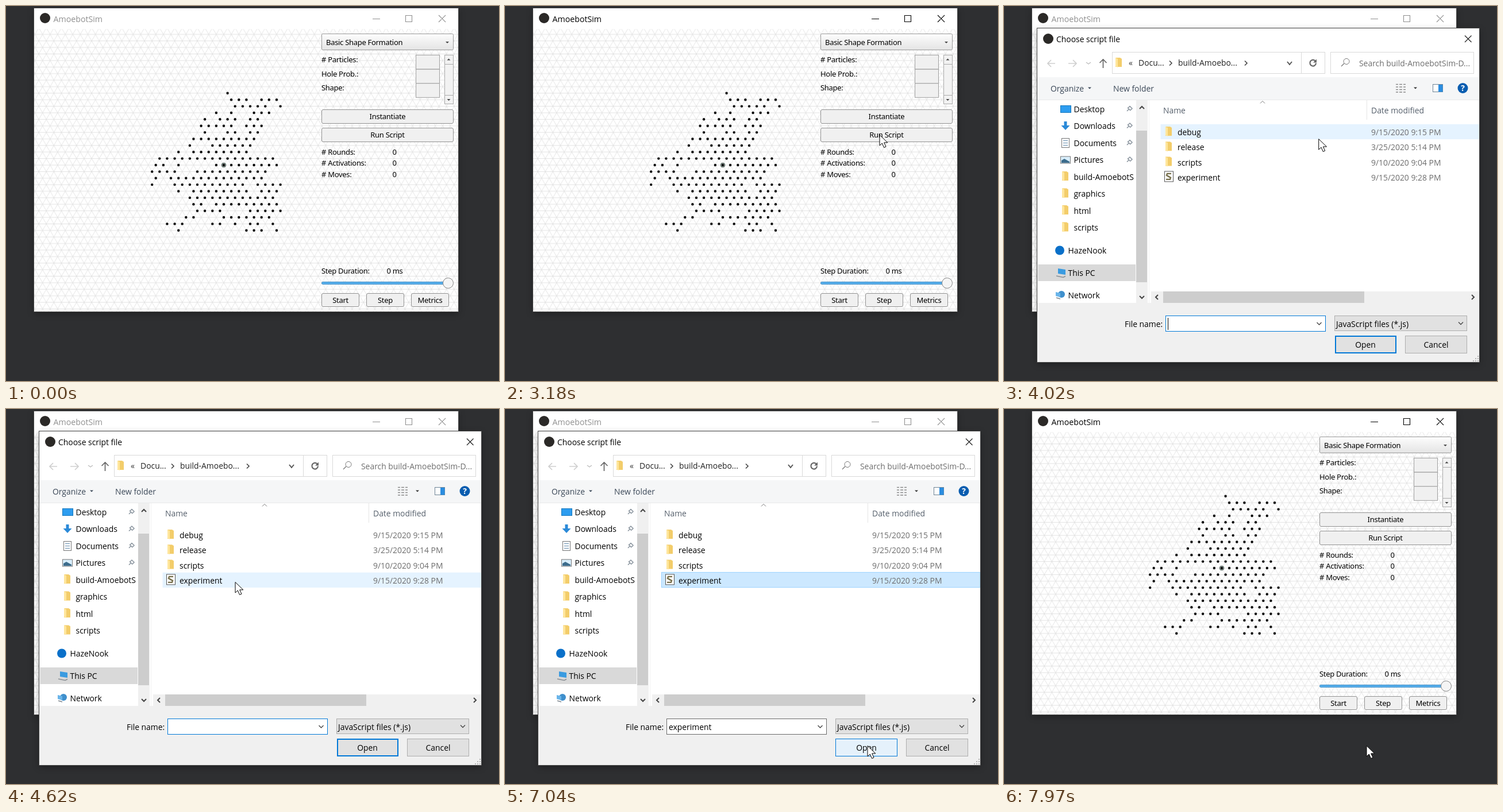
Animation, 858 px wide and 653 px high, one loop 8 s. Source, as an HTML page:

```html
<!DOCTYPE html>
<html lang="en">
<head>
<meta charset="utf-8">
<title>Choosing a script</title>
<style>
  html, body { margin: 0; width: 100%; height: 100%; overflow: hidden; background: #2e2f31; }
  svg { display: block; width: 858px; height: 653px; }
  text { font: 13.9px "Open Sans", sans-serif; white-space: pre; }
  #panel text { font: 13px "Noto Sans", sans-serif; letter-spacing: -.3px; }
  .shadow { filter: drop-shadow(0 3px 6px rgba(0, 0, 0, .35)); }
</style>
</head>
<body>
<script>
const LOOP = 8000;

// ---- drawing helpers ----
const rect = (x, y, w, h, fill, stroke = 'none', extra = '') =>
  `<rect x="${x}" y="${y}" width="${w}" height="${h}" fill="${fill}" stroke="${stroke}" ${extra}/>`;
const circle = (x, y, r, fill, stroke = 'none') =>
  `<circle cx="${x}" cy="${y}" r="${r}" fill="${fill}" stroke="${stroke}"/>`;
const line = (d, stroke, width = 1, extra = '') =>
  `<path d="${d}" fill="none" stroke="${stroke}" stroke-width="${width}" ${extra}/>`;
const shape = (d, fill) => `<path d="${d}" fill="${fill}"/>`;
const text = (x, y, s, fill = '#000', extra = '') =>
  `<text x="${x}" y="${Math.round(y)}" fill="${fill}" ${extra}>${s}</text>`;
const centred = (x, y, s) => text(x, y, s, '#000', 'text-anchor="middle"');
const caretDown = (x, y, fill = '#444', r = 3) => shape(`M${x - r} ${y - r / 2}h${2 * r}l${-r} ${r}z`, fill);
const caretUp = (x, y, fill = '#444', r = 3) => shape(`M${x - r} ${y + r / 2}h${2 * r}l${-r} ${-r}z`, fill);
const chevron = (x, y, dx, dy, color = '#444', width = 1.6) => line(dx
  ? `M${x - dx / 2} ${y - 4}l${dx} 4l${-dx} 4`
  : `M${x - 4} ${y - dy / 2}l4 ${dy}l4 ${-dy}`, color, width);
const folder = (x, y) =>
  shape(`M${x} ${y}h8l3 2v14h-11z`, '#f3cd6b') + shape(`M${x} ${y}l4 2v15l-4 -2z`, '#ffe69c');

// ---- simulator window ----
const DX = 13.14, DY = 11.38, ORIGIN = { x: 379, y: 277, row: 11 };

// Each row: runs of [start in half cells from the origin, count].
const particleRows = [
  [[1, 1]], [[2, 3], [10, 3]], [[3, 5], [15, 1]], [[-2, 1], [2, 1], [8, 3]],
  [[-5, 1], [-1, 3], [7, 2]], [[-6, 5], [6, 3]], [[-5, 1], [1, 2], [7, 2]], [[-8, 9]],
  [[-9, 1], [-3, 6]], [[-12, 1], [-8, 8]], [[-17, 16]], [[-18, 2], [-12, 1], [-2, 9]],
  [[-19, 4], [-7, 10]], [[-18, 1], [-14, 13]], [[-19, 1], [-13, 10], [9, 4]],
  [[-12, 1], [-8, 8], [10, 3]], [[-9, 12]], [[-8, 2], [-2, 9]], [[-7, 4], [7, 5]],
  [[-10, 2], [0, 7]], [[-15, 3], [-3, 2], [3, 1], [7, 2], [13, 1]], [[-12, 1], [6, 3], [14, 1]]
];
const particles = particleRows.map((runs, row) => runs.map(([start, count]) =>
  Array.from({ length: count }, (_, i) => circle(
    (ORIGIN.x + (start / 2 + i) * DX).toFixed(1),
    (ORIGIN.y + (row - ORIGIN.row) * DY).toFixed(1), 2.2, '#080808')).join('')).join('')).join('');

const button = (x, y, w, h, label) =>
  rect(x + .5, y + .5, w - 1, h - 1, '#f0f0f0', '#929292', 'rx="2.5"') + centred(x + w / 2, y + h / 2 + 4.5, label);
const field = (y, label) => text(549, y + 13, label) + rect(713.5, y + .5, 41, 24.5, '#f0f0f0', '#a0a0a0');
const counter = (y, label) => text(549, y, label) + centred(676, y, '0');

const panel = `<g id="panel">
  ${rect(549.5, 48.5, 229, 28, 'url(#combo)', '#999', 'rx="2"')}
  ${text(557, 68, 'Basic Shape Formation')}${caretDown(768, 63.5)}
  ${field(85, '# Particles:')}${field(109.7, 'Hole Prob.:')}${field(134.3, 'Shape:')}
  ${rect(763.5, 85.5, 15, 85, '#f2f2f2', '#aaa')}
  ${line('M763 101.5h15M763 155.5h15', '#aaa')}${caretUp(770.5, 93)}${caretDown(770.5, 163.5)}
  ${button(549, 180, 230, 25, 'Instantiate')}${button(549, 212, 230, 25, 'Run Script')}
  ${counter(258.5, '# Rounds:')}${counter(278, '# Activations:')}${counter(298, '# Moves:')}
  ${text(549, 466, 'Step Duration:')}${text(662.5, 466, '0 ms')}
  ${rect(549.5, 480.5, 220, 4, '#59b0ec', '#3d8cc6', 'rx="2"')}
  ${circle(769.5, 482.5, 9, '#f5f5f5', '#858585')}
  ${button(549, 500, 66, 24, 'Start')}${button(627, 500, 66, 24, 'Step')}${button(705, 500, 66, 24, 'Metrics')}
</g>`;

const simulator = `
  ${rect(49, 4, 738, 528, '#fff', 'none', 'class="shadow"')}
  ${rect(49, 40, 738, 492, 'url(#lattice)')}
  ${rect(48.5, 3.5, 739, 529, 'none', '#4a4a4a')}
  ${circle(68, 21, 9, '#2b2927')}
  <g id="caption">
    ${text(82.5, 28, 'AmoebotSim', '#000', 'style="font-size:14.2px"')}
    ${line('M638 22.5h13M695.5 16.5h11v11h-11zM753 16l12 12M765 16l-12 12', '#000', 1.1)}
  </g>
  ${circle(379, 277, 3.8, '#8d9b96', '#53615c')}${particles}${panel}`;

// ---- file dialog ----
const GREY = '#6d6d6d', BLUE = '#0078d7', ROW_TOP = 205.8, ROW_H = 26.3;

const pin = y => line(`M214 ${y + 4}l3.5 -3.5M215 ${y - 2}l5 5M216 ${y - 1.5}l3 -3l4 4l-3 3`, '#8a949e', 1.5);
const page = (x, y, w, h) =>
  rect(x + .5, y + .5, w, h, '#fff', '#777') + line(`M${x + 3} ${y + 4.5}h${w - 5}m0 4h${5 - w}m0 4h${w - 5}`, '#5d87aa');
const quickAccess = ['Desktop', 'Downloads', 'Documents', 'Pictures', 'build-AmoebotS', 'graphics', 'html', 'scripts'];
const quickIcons = [
  rect(98.5, 173.5, 18, 12, '#2d9df0', '#1477bd'),
  shape('M104.5 201h5v7h5l-7.500 8l-7.500 -8h5z', '#2b8ad8'),
  page(100, 230, 13, 16),
  rect(98.5, 262, 17, 12, '#d9eefb', '#777') + shape('M100 273v-4l5 -3l9 5v2z', '#3c6c8c')
];
const sidebar = quickAccess.map((name, i) => {
  const y = 179 + i * 29.5;
  return (quickIcons[i] || folder(101, y - 9)) + text(121.5, y + 5.5, name) + (i < 4 ? pin(y) : '');
}).join('') + `
  ${circle(97, 425.5, 8, '#0a70c9')}${text(111.5, 431, 'HazeNook')}
  ${rect(59, 450, 170, 29, '#d9d9d9')}
  ${shape('M94 457l13 2v9l-13 -2z', '#3a9be0')}${line('M91 470l12 2.500l4 -2', '#8a8f94', 1.5)}
  ${text(111.5, 470, 'This PC')}
  ${circle(100, 502, 6, '#3f8fcc')}${shape('M90 498l8 2v7l-8 -2z', '#6ab5ea')}${line('M91 508l7 2', '#7d8790', 1.5)}
  ${text(111.5, 509, 'Network')}`;

const files = [['debug', '9/15/2020 9:15 PM'], ['release', '3/25/2020 5:14 PM'],
  ['scripts', '9/10/2020 9:04 PM'], ['experiment', '9/15/2020 9:28 PM']];
const fileRows = files.map(([name, date], i) => {
  const y = 225 + i * ROW_H;
  const icon = i < 3 ? folder(281, y - 15)
    : rect(279.5, y - 16, 15, 18, '#fff', '#555') + line(`M291 ${y - 12}h-7l-1 3l7 4l-1 3h-7`, '#77704c', 2.4);
  return icon + text(302, y, name) + text(639, y, date, GREY);
}).join('');

const toolbar = `
  ${line('M89 100H76m6 -6l-6 6l6 6M112 100h14m-6 -6l6 6l-6 6', '#cfcfcf', 1.7)}
  ${chevron(147, 99.5, 0, 3, '#bbb', 1.3)}
  ${line('M172.500 108V93m-6 6l6 -6l6 6', '#666', 1.7)}
  ${rect(188.5, 80.5, 370, 37, '#fff', '#d9d9d9')}${line('M517.500 81v37', '#d9d9d9')}
  ${folder(194, 90)}${text(217, 103.5, '«', '#333')}${text(234, 104, 'Docu...', '#222')}${chevron(290, 99.5, 4, 0)}
  <g id="pathWide">${text(303, 104, 'build-AmoebotSi...', '#222')}</g>
  <g id="pathShort">${text(303, 104, 'build-Amoebo...', '#222')}${chevron(421, 99.5, 4, 0)}</g>
  ${chevron(497, 99.5, 0, 5, '#555', 2)}
  ${line('M541.500 95.500a5.300 5.300 0 1 0 1.500 4', '#666', 2.2)}${shape('M538 98.500h6v-6z', '#666')}
  ${rect(568.5, 80.5, 249, 37, '#fff', '#d9d9d9')}
  ${line('M587 105l5 -5', '#777', 1.3)}${circle(596, 96.5, 5, 'none', '#777')}
  ${text(618, 104.5, 'Search build-AmoebotSim-D...', GREY)}
  ${rect(58, 124, 769, 40, '#f5f6f7')}${line('M58 163.500h769', '#e8e9ea')}
  ${text(81, 149, 'Organize', '#3b4858')}${caretDown(149, 143, '#3b4858')}${text(190, 149, 'New folder', '#3b4858')}
  ${line('M682 136.500h18m-18 4.500h18m-18 4.500h18m-18 4.500h18', '#8b8b8b', 1.6, 'stroke-dasharray="4 2 5 2"')}
  ${caretDown(716, 143, '#333')}
  ${rect(746.5, 136.5, 17, 13, '#fff', '#6f8596')}${rect(756, 137, 7.5, 12.5, '#2b8de0')}
  ${circle(798.5, 143, 9, '#0a5db0')}
  ${text(798.5, 148, '?', '#fff', 'text-anchor="middle" style="font-weight:700"')}`;

const footer = `
  ${rect(58, 517, 769, 103, '#f0f0f0')}
  ${text(210, 559, 'File name:')}
  ${rect(281.5, 539.5, 278, 27, '#fff', BLUE, 'id="nameBox"')}
  ${line('M285.500 543v21', '#000', 1, 'id="caret"')}
  ${text(285, 559, 'experiment', '#000', 'id="fileName"')}${chevron(548.5, 553, 0, 4, '#444', 1.3)}
  ${rect(575.5, 539.5, 230, 26, '#e1e1e1', '#adadad')}
  ${rect(575.5, 539.5, 230, 26, '#e5f1fb', BLUE, 'id="typeHover"')}
  ${text(578, 558.5, 'JavaScript files (*.js)')}${chevron(795, 552.5, 0, 4, '#444', 1.3)}
  ${rect(577, 575, 105, 29, '#e1e1e1', BLUE, 'stroke-width="2"')}
  <g id="openHover">${rect(575, 573, 108, 33, '#f0f0f0')}${rect(575.5, 574.5, 107, 30, '#e5f1fb', BLUE)}</g>
  ${centred(629, 595, 'Open')}
  ${rect(698.5, 574.5, 107, 30, '#e1e1e1', '#adadad')}${centred(752, 595, 'Cancel')}
  ${line('M816 618h10M820 614h6M824 610h2', '#b5b5b5', 2, 'stroke-dasharray="2 2"')}`;

const dialog = `<g id="dialog">
  ${rect(58, 39, 769, 581, '#fff', 'none', 'class="shadow"')}
  ${circle(77, 57, 9, '#2b2927')}${text(91, 63, 'Choose script file')}
  ${line('M802 51.500l11.500 11.500M813.500 51.500l-11.500 11.500', '#222', 1.2)}
  ${toolbar}${sidebar}
  ${rect(230, 164, 20, 353, '#f0f0f0')}${rect(230, 217, 19, 264, '#cdcdcd')}
  ${line('M236 179l4 -4l4 4M236 505l4 4l4 -4', '#444', 2)}
  ${line('M252.500 164v353', '#f2f2f2')}${line('M446 169.500l4 -4l4 4', '#777')}
  ${text(277, 187, 'Name', '#555f6b')}${line('M631.500 164v34', '#e5e5e5')}${text(639, 187, 'Date modified', '#555f6b')}
  ${rect(272.5, 0, 554.5, ROW_H, '#e5f3ff', 'none', 'id="rowMark"')}${fileRows}
  ${rect(256, 497, 571, 20, '#f0f0f0')}${rect(277, 497, 350, 20, '#cdcdcd')}
  ${line('M268 503l-4 4l4 4M814 503l4 4l-4 4', '#444', 2)}
  ${footer}${rect(57.5, 38.5, 770, 582, 'none', '#4a4a4a')}
</g>`;

document.body.innerHTML = `<svg viewBox="0 0 858 653">
  <defs>
    <linearGradient id="combo" x2="0" y2="1"><stop stop-color="#fdfdfd"/><stop offset="1" stop-color="#e4e4e4"/></linearGradient>
    <pattern id="lattice" patternUnits="userSpaceOnUse" x="${ORIGIN.x}" y="${ORIGIN.y}" width="${DX}" height="${2 * DY}">
      ${line(`M0 0H${DX}M0 ${DY}H${DX}M0 ${2 * DY}H${DX}M0 0L${DX} ${2 * DY}M${DX} 0L0 ${2 * DY}`, '#dcdcdc', .8)}
    </pattern>
  </defs>
  ${simulator}${dialog}
  <path id="cursor" d="M0 .5V19L4.300 15L7.600 22.500L11 21L7.700 13.900H13.800Z" fill="#fff" stroke="#000"/>
</svg>`;

// ---- motion ----
const el = id => document.getElementById(id);
const show = (id, on) => el(id).style.display = on ? '' : 'none';
const ramp = (t, from, to) => Math.min(1, Math.max(0, (t - from) / (to - from)));

// Pointer waypoints: time, x, y.
const route = [
  [190, 738, 656], [1010, 415, 24], [1040, 417, 17], [1715, 417, 17], [2060, 520, 99],
  [2540, 645, 216], [2640, 652, 224], [3670, 652, 224], [4020, 548, 231], [4380, 446, 262],
  [4560, 399, 301], [5735, 399, 301], [5750, 404, 305], [6550, 625, 574], [6640, 631, 586], [LOOP, 631, 586]
];
function pointerAt(t) {
  const i = Math.max(1, route.findIndex(p => p[0] > t));
  const [a, b] = [route[i - 1], route[i]];
  const k = ramp(t, a[0], b[0]);
  return [a[1] + (b[1] - a[1]) * k, a[2] + (b[2] - a[2]) * k];
}

function draw(t) {
  const [x, y] = pointerAt(t);
  show('cursor', t >= 210);
  el('cursor').setAttribute('transform', `translate(${x} ${y})`);

  const active = ramp(t, 1060, 1150) - ramp(t, 3190, 3290) + ramp(t, 7600, 7700);
  el('caption').style.opacity = .44 + .56 * active;

  const opening = ramp(t, 3550, 3800), closing = ramp(t, 7580, 7780);
  const scale = 1 - .1 * (1 - opening) ** 3 - .08 * closing;
  show('dialog', t >= 3580 && closing < 1);
  el('dialog').style.opacity = Math.min(1, opening * 1.48) * (1 - closing);
  el('dialog').setAttribute('transform', `translate(443 329.5) scale(${scale}) translate(-443 -329.5)`);
  show('pathWide', t < 3800);
  show('pathShort', t >= 3800);

  const selected = t >= 5300, named = t >= 5440;
  const row = selected ? 3 : Math.min(3, Math.max(0, Math.floor((y - ROW_TOP) / ROW_H)));
  const mark = el('rowMark');
  mark.setAttribute('y', ROW_TOP + row * ROW_H - (selected ? .3 : 0));
  mark.setAttribute('fill', selected ? '#cce8ff' : '#e5f3ff');
  mark.setAttribute('stroke', selected ? '#99d1ff' : 'none');

  show('caret', !named && (t < 4130 || (t >= 4660 && t < 5190)));
  show('fileName', named);
  el('nameBox').setAttribute('stroke', named ? '#6a6a6a' : BLUE);
  el('typeHover').style.opacity = ramp(t, 6450, 6540) - ramp(t, 6560, 6760);
  el('openHover').style.opacity = ramp(t, 6560, 6760);
}

const begin = performance.now();
(function frame() {
  draw((performance.now() - begin) % LOOP);
  requestAnimationFrame(frame);
})();
</script>
</body>
</html>
```
